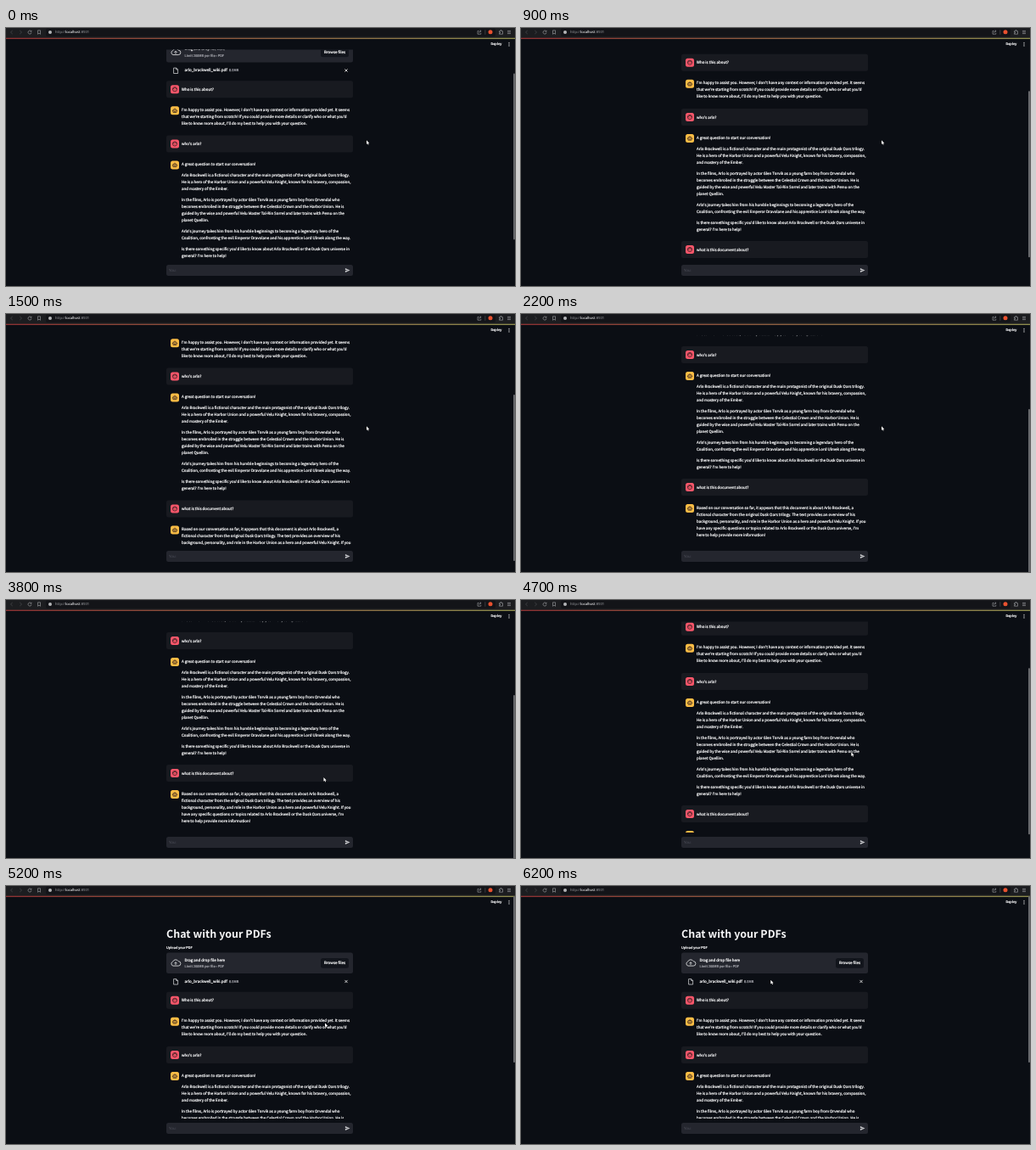
An HTML page with a canvas that plays this animation: 600x304 px, repeating every 6.3 s.

```html
<!DOCTYPE html>
<html lang="en">
<head>
<meta charset="utf-8">
<title>Chat with your PDFs</title>
<style>
html, body { margin: 0; width: 100%; height: 100%; overflow: hidden; background: #0b0e14; }
canvas { display: block; width: 600px; height: 304px; }
</style>
</head>
<body>
<canvas id="stage" width="600" height="304"></canvas>
<script>
const ctx = document.getElementById('stage').getContext('2d');
const LOOP = 6300, STEP = 100;
const BG = '#0b0e14', PANEL = '#24262e', BUBBLE = '#181a20', WHITE = '#f6f6f7', GREY = '#9a9ba2';
const SANS = '"Noto Sans CJK JP", "Noto Sans CJK SC", "Noto Sans CJK KR", "Open Sans", sans-serif';
const BODY = 4.48, SMALL = 3.92, TEXT_SCALE = 10;
const VIEW_TOP = 12, VIEW_H = 296, PAGE_H = 447;

// Keyframes: time, then values; linear in between
const SCROLL = [[0, 62.5], [900, 94], [1500, 125.5], [2000, 151], [4300, 151],
  [4400, 143], [4700, 103], [5000, 24.5], [5200, 0]];
const POINTER = [[2700, 425, 132.3], [3400, 385, 186], [3700, 374, 211], [3800, 374.4, 209],
  [4000, 384, 190], [4300, 384, 190], [4700, 389.3, 179.3], [5000, 388.7, 170],
  [5100, 388, 169], [5700, 316, 124], [6200, 294.3, 110.8]];

const FIRST_REPLY = [[
  "I'm happy to assist you. However, I don't have any context or information provided yet. It seems",
  "that we're starting from scratch! If you could provide more details or clarify who or what you'd",
  "like to know more about, I'll do my best to help you with your question."]];
const SECOND_REPLY = [
  ["A great question to start our conversation!"],
  ["Arlo Brackwell is a fictional character and the main protagonist of the original Dusk Oars trilogy.",
   "He is a hero of the Harbor Union and a powerful Velu Knight, known for his bravery, compassion,",
   "and mastery of the Ember."],
  ["In the films, Arlo is portrayed by actor Glen Torvik as a young farm boy from Orvendal who",
   "becomes embroiled in the struggle between the Celestial Crown and the Harbor Union. He is",
   "guided by the wise and powerful Velu Master Tal-Rin Sorrel and later trains with Pemu on the",
   "planet Quellim."],
  ["Arlo's journey takes him from his humble beginnings to becoming a legendary hero of the",
   "Coalition, confronting the evil Emperor Dravolane and his apprentice Lord Ulmek along the way."],
  ["Is there something specific you'd like to know about Arlo Brackwell or the Dusk Oars universe in",
   "general? I'm here to help!"]];
const THIRD_REPLY = [[
  "Based on our conversation so far, it appears that this document is about Arlo Brackwell, a",
  "fictional character from the original Dusk Oars trilogy. The text provides an overview of his",
  "background, personality, and role in the Harbor Union as a hero and powerful Velu Knight. If you",
  "have any specific questions or topics related to Arlo Brackwell or the Dusk Oars universe, I'm",
  "here to help provide more information!"]];

function sample(keys, t) {
  const next = keys.findIndex(k => k[0] > t);
  if (next < 0) return keys[keys.length - 1].slice(1);
  if (next === 0) return keys[0].slice(1);
  const a = keys[next - 1], b = keys[next], p = (t - a[0]) / (b[0] - a[0]);
  return a.slice(1).map((v, i) => v + (b[i + 1] - v) * p);
}

// Placed by the middle of the capitals; set large and scaled down so tiny glyphs space evenly.
// The hairline stroke firms up the strokes. Returns the width.
function text(str, x, y, { size = BODY, color = WHITE, weight = 400, family = SANS, stroke = 0.22 } = {}) {
  ctx.save();
  ctx.translate(x, y + size * 0.36);
  ctx.scale(1 / TEXT_SCALE, 1 / TEXT_SCALE);
  ctx.font = `${weight} ${size * TEXT_SCALE}px ${family}`;
  ctx.fillStyle = ctx.strokeStyle = color;
  ctx.lineJoin = 'round';
  ctx.fillText(str, 0, 0);
  if (stroke) {
    ctx.lineWidth = stroke * TEXT_SCALE;
    ctx.strokeText(str, 0, 0);
  }
  const width = ctx.measureText(str).width / TEXT_SCALE;
  ctx.restore();
  return width;
}

function box(x, y, w, h, color, r = 0) {
  ctx.fillStyle = color;
  ctx.beginPath();
  ctx.roundRect(x, y, w, h, r);
  ctx.fill();
}

function disc(x, y, r, color) {
  box(x - r, y - r, r * 2, r * 2, color, r);
}

function icon(d, x, y, { stroke, fill, width = 0.6 }) {
  const path = new Path2D(d);
  ctx.save();
  ctx.translate(x, y);
  if (stroke) { ctx.strokeStyle = stroke; ctx.lineWidth = width; ctx.stroke(path); }
  if (fill) { ctx.fillStyle = fill; ctx.fill(path); }
  ctx.restore();
}

function avatar(y, color, face) {
  box(194, y - 5, 10, 10, color, 2.5);
  icon(face, 199, y, { stroke: '#2a1a1c', width: 0.7 });
}

function question(str, y) {
  box(189, y - 10, 220, 20, BUBBLE, 2.5);
  avatar(y, '#f8566a', 'M2.6 0A2.6 2.6 0 1 1 -2.6 0A2.6 2.6 0 1 1 2.6 0M-2.5 -.4Q-.6 -.6 0 -2Q.8 -.5 2.5 -.6M-1.2 .7H-.6M.6 .7H1.2');
  text(str, 207, y);
}

function reply(paragraphs, y) {
  avatar(y + 1, '#fcbd45', 'M-1.9 -1.3H1.9V2.2H-1.9ZM0 -1.3V-2.8M-2.7 -.3V1M2.7 -.3V1M-1.1 0H-.5M.5 0H1.1M-.9 1.2H.9');
  for (const lines of paragraphs) {
    for (const line of lines) { text(line, 207, y); y += 8; }
    y += 5;
  }
}

function drawPage(scroll) {
  ctx.save();
  ctx.beginPath();
  ctx.rect(0, 25.5, 598, 248.5);
  ctx.clip();
  ctx.translate(0, -scroll);

  text('Chat with your PDFs', 189, 56, { size: 12.5, weight: 700, stroke: 0 });
  text('Upload your PDF', 189, 73, { size: SMALL });

  box(189, 78.5, 220, 24.5, PANEL, 2.5);
  icon('M-3 3.6A2.6 2.6 0 0 1 -3.3 -1.4A3.6 3.6 0 0 1 3.2 -1.8A2.7 2.7 0 0 1 3.2 3.6ZM0 2.6V-.6M-1.6 .8L0 -.8L1.6 .8',
    200, 90.5, { stroke: '#d5d6d9', width: 0.9 });
  text('Drag and drop file here', 210.5, 87);
  text('Limit 200MB per file • PDF', 210.5, 95, { size: SMALL, color: GREY });
  box(371, 85, 33, 11.7, '#12151c', 2.5);
  ctx.textAlign = 'center';
  text('Browse files', 387.5, 90.6);
  ctx.textAlign = 'left';

  icon('M-2.4 -3.2H.8L2.6 -1.4V3.2H-2.4ZM.7 -3.2V-1.3H2.6', 200, 112.8, { stroke: '#d5d6d9', width: 0.75 });
  const nameWidth = text('arlo_brackwell_wiki.pdf', 210.5, 112.3);
  text('8.5MB', 212.7 + nameWidth, 112.4, { size: SMALL, color: GREY });
  icon('M-1.6 -1.6L1.6 1.6M1.6 -1.6L-1.6 1.6', 401, 112.5, { stroke: WHITE, width: 0.8 });

  question('Who is this about?', 134.7);
  reply(FIRST_REPLY, 158.8);
  question("who's arlo?", 199);
  reply(SECOND_REPLY, 223);
  question('what is this document about?', 355);
  reply(THIRD_REPLY, 379);
  ctx.restore();
}

function drawBrowser() {
  box(0, 0, 600, 12, '#1c1d20');
  box(47, 0.5, 530, 9.5, '#131418', 2);
  const line = { stroke: '#a5a6a9' }, dim = { stroke: '#55565a' };
  icon('M1.2 -2L-1 0L1.2 2', 6.5, 5, dim);
  icon('M-1.2 -2L1 0L-1.2 2', 17.5, 5, dim);
  icon('M1.6 -1.2A2 2 0 1 0 2 .4M2 -2.2V-.8H.6', 28, 5, line);
  icon('M-1.5 -2.2H1.5V2.3L0 1.1L-1.5 2.3Z', 39, 5, line);
  disc(52, 5, 2, '#b4b5b8');
  let x = 58;
  for (const [part, color] of [['http://', '#85868a'], ['localhost', '#e4e4e6'], [':8501', '#85868a']])
    x += text(part, x, 4.8, { size: 4.15, color, family: '"Open Sans", sans-serif', stroke: 0.1 });
  icon('M-.5 -1.6H-2V2.2H1.8V.8M-.6 .6Q-.4 -1.2 2 -1.4M.8 -2.5L2.1 -1.4L.8 -.2', 558, 5, line);
  box(564.6, 2.3, 0.6, 5.4, '#55565a');
  disc(571, 4.7, 2.5, '#e9512f');
  icon('M-2 -1.3H-.6V-2.4H.6V-1.3H2V2.2H-2V1H-1V0H-2Z', 583.5, 5, line);
  icon('M-2 -1.6H2M-2 0H2M-2 1.6H2', 593, 5, line);

  const strip = ctx.createLinearGradient(0, 0, 600, 0);
  strip.addColorStop(0, '#b83c3c');
  strip.addColorStop(1, '#b8b660');
  box(0, 11.8, 600, 0.9, strip);

  text('Deploy', 571.5, 19, { size: SMALL });
  for (const y of [17.3, 19.1, 20.9]) disc(593, y, 0.6, WHITE);
}

function drawInput() {
  box(189, 279, 220, 13, PANEL, 2.5);
  text('You:', 192, 285.6, { color: '#50525c', stroke: 0 });
  icon('M-2.7 -2.4L2.9 0L-2.7 2.4V.6L1 0L-2.7 -.6Z', 402.6, 285.5, { fill: '#c9cacd' });
}

function draw(time) {
  const t = Math.floor((time % LOOP) / STEP) * STEP;
  const [scroll] = sample(SCROLL, t);
  const [x, y] = sample(POINTER, t);
  ctx.textRendering = 'geometricPrecision';
  box(0, 0, 600, 304, BG);
  drawPage(scroll);
  drawInput();
  drawBrowser();
  box(598, VIEW_TOP + scroll / PAGE_H * VIEW_H, 2, VIEW_H * VIEW_H / PAGE_H, '#66676b', 0.8);
  icon('M0 0V4.7L1.1 3.7L1.9 5.4L2.7 5L1.9 3.4H3.4Z', x, y, { stroke: '#000', fill: '#fff' });
}

const start = performance.now();
function tick() {
  draw(performance.now() - start);
  requestAnimationFrame(tick);
}
tick();
</script>
</body>
</html>
```
